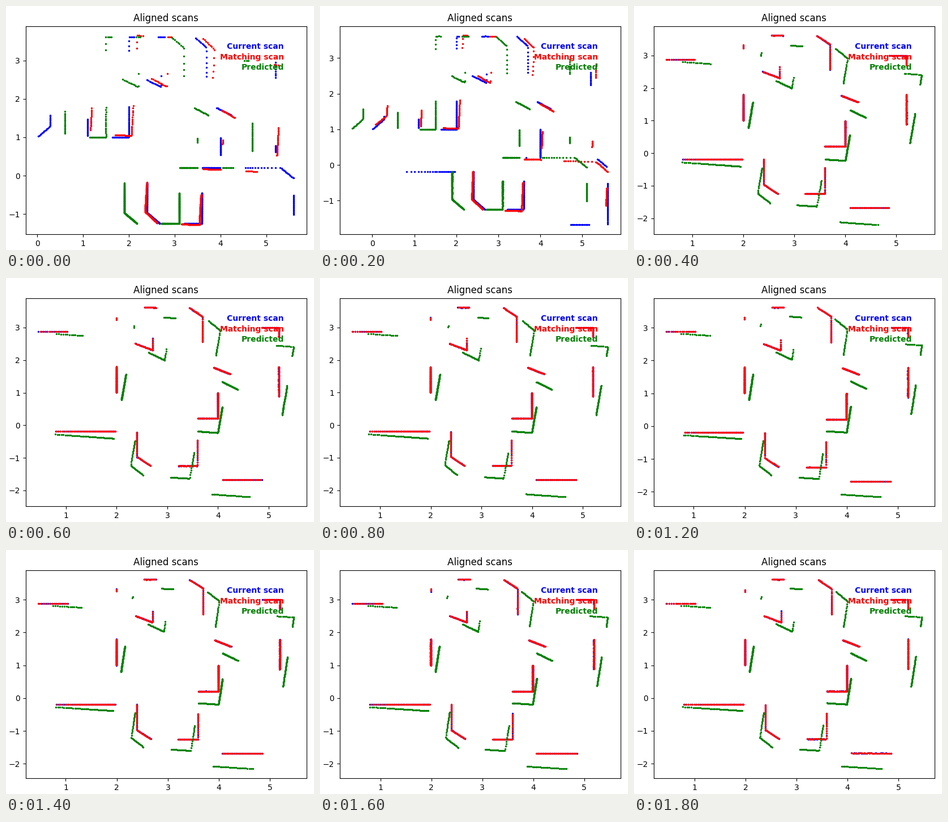
Animation of 544 by 433 pixels, one loop 2000 ms. Source, as a matplotlib script:

```python
import numpy as np
import matplotlib.pyplot as plt
from matplotlib.animation import FuncAnimation

W, H, DPI = 544, 433, 100
FRAMES, INTERVAL = 10, 200
RAY_STEP = np.radians(0.5)
ROBOT_X = 3.0
DRIVE_START, DRIVE_STEP, PARKED = -0.78, 0.5, 1.10
DRIVE_FRAMES = 2

# Floor plan: the corners of each wall
WALLS = [
    [(2.4, -0.19), (2.4, -0.97), (2.68, -1.25)],
    [(3.21, -1.25), (3.6, -1.25), (3.6, -0.45)],
    [(0.8, -0.19), (1.98, -0.19)],
    [(1.63, 1.0), (2.0, 1.0), (2.0, 1.8)],
    [(1.1, 1.03), (1.1, 1.72)],
    [(0.01, 1.01), (0.28, 1.29), (0.28, 1.6)],
    [(0.4, 2.88), (1.05, 2.88)],
    [(2.0, 3.23), (2.0, 3.615), (2.2, 3.615)],
    [(2.37, 2.51), (2.71, 2.31), (2.71, 2.67)],
    [(2.4, 3.615), (2.78, 3.615)],
    [(3.43, 3.615), (3.7, 3.34), (3.7, 2.55)],
    [(3.92, 1.77), (4.25, 1.57)],
    [(3.6, 0.21), (4.0, 0.21), (4.0, 1.0)],
    [(4.53, 0.2), (5.32, 0.2), (5.6, -0.07)],
    [(5.6, -0.5), (5.6, -1.66)],
    [(4.05, -1.68), (5.17, -1.68)],
    [(5.2, 0.62), (5.2, 1.8)],
    [(4.85, 3.0), (5.2, 3.0), (5.2, 2.24)],
]
A = np.array([p for wall in WALLS for p in wall[:-1]])
B = np.array([p for wall in WALLS for p in wall[1:]])


def cross(p, q):
    return p[..., 0] * q[..., 1] - p[..., 1] * q[..., 0]


def scan(y, seed):
    """Nearest wall hit of every ray sent out by the robot at height y."""
    rng = np.random.default_rng(seed)
    angles = np.arange(0, 2 * np.pi, RAY_STEP) + rng.uniform(0, RAY_STEP)
    rays = np.column_stack((np.cos(angles), np.sin(angles)))
    robot = np.array([ROBOT_X, y])
    d, to_wall, edge = rays[:, None], (A - robot)[None], (B - A)[None]
    with np.errstate(divide="ignore", invalid="ignore"):
        dist = cross(to_wall, edge) / cross(d, edge)
        along = cross(to_wall, d) / cross(d, edge)
    hit = (dist > 0) & (along >= 0) & (along <= 1)
    reach = np.where(hit, dist, np.inf).min(axis=1)
    seen = np.isfinite(reach)
    reach = reach[seen] + rng.normal(0, 0.001, seen.sum())
    return robot + rays[seen] * reach[:, None]


def move(points, angle, dx=0.0, dy=0.0):
    """Turn clockwise about the origin, then shift."""
    c, s = np.cos(angle), np.sin(angle)
    x, y = points.T
    return np.column_stack((c * x + s * y + dx, c * y - s * x + dy))


def scans(k):
    """Current, matched and predicted points of step k."""
    if k < DRIVE_FRAMES:
        y = DRIVE_START + DRIVE_STEP * k
        last, current = scan(y, k), scan(y + DRIVE_STEP, k + 1)
        matched = move(last, 0.05 - 0.008 * k, 0.008, 0.145 - 0.037 * k)
        return current, matched, move(last, 0, -DRIVE_STEP)
    drift = -0.002 * (k - DRIVE_FRAMES)
    last, current = (move(scan(PARKED, s), 0, drift) for s in (k, k + 1))
    return current, last, move(last, 0.11 if k < 5 else 0.1)


def padded(values):
    lo, hi = values.min(), values.max()
    m = 0.05 * (hi - lo)
    return lo - m, hi + m


fig = plt.figure(figsize=(W / DPI, H / DPI), dpi=DPI, facecolor="white")
ax = fig.add_axes([34.75 / W, 27.88 / H, 496 / W, 369.6 / H])
ax.set_title("Aligned scans")

lines = []
labels = [("Current scan", "blue"), ("Matching scan", "red"), ("Predicted", "green")]
for i, (label, color) in enumerate(labels):
    lines += ax.plot([], [], "o", color=color, markersize=1, markeredgewidth=1.5)
    ax.text(0.92, 0.9 - 0.05 * i, label, color=color, weight="bold",
            ha="right", va="center", transform=ax.transAxes)


def update(k):
    sets = scans(k)
    for line, points in zip(lines, sets):
        line.set_data(*points.T)
    x, y = np.vstack(sets).T
    ax.set_xlim(*padded(x))
    ax.set_ylim(*padded(y))
    return lines


anim = FuncAnimation(fig, update, frames=FRAMES, interval=INTERVAL,
                     init_func=lambda: update(0), repeat=True, repeat_delay=0)
plt.show()
```
